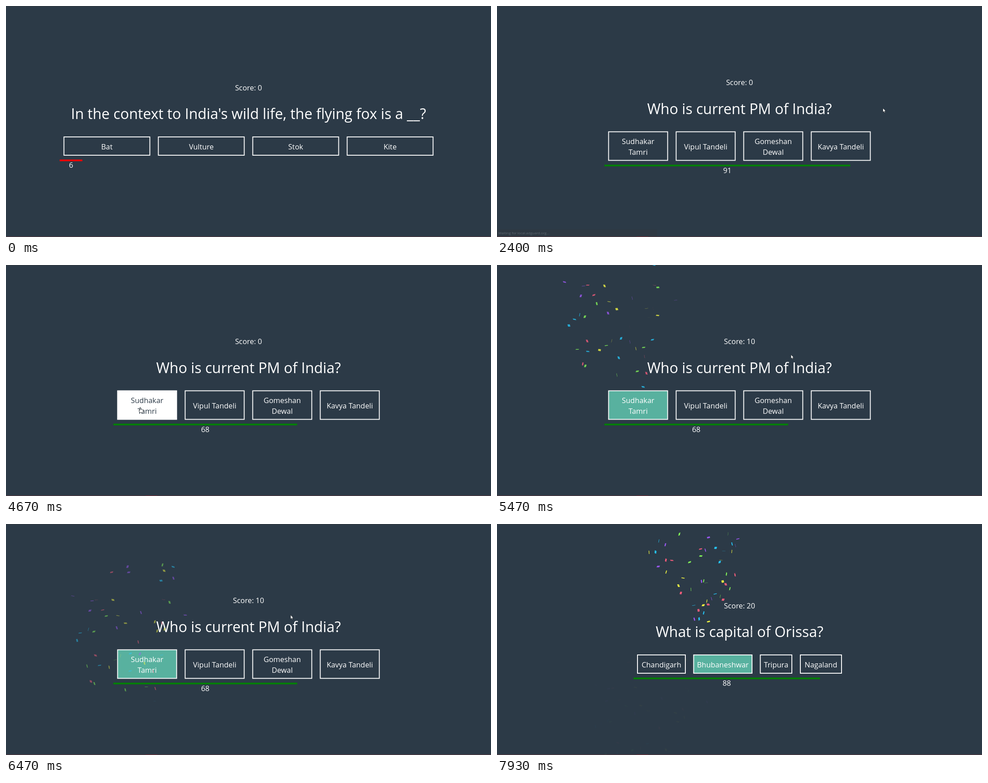
Animation, 1084 px wide and 517 px high, one loop 8 s. Source, as an HTML page with a canvas:

```html
<!DOCTYPE html>
<html lang="en">
<head>
<meta charset="utf-8">
<title>Quiz</title>
<style>
  html, body { margin: 0; width: 100%; height: 100%; overflow: hidden; background: #2c3a47; }
  svg, canvas { position: absolute; left: 0; top: 0; width: 1084px; height: 517px; }
  text { font: 16.4px "Open Sans", "Noto Sans", sans-serif; fill: #fff; text-anchor: middle; }
  .title { font-size: 32.3px; }
  .option rect { fill: none; stroke: #fff; stroke-width: 1.9; }
  .option.hover rect { fill: #fff; }
  .option.hover text { fill: #2c3a47; }
  .option.correct rect { fill: #58b19f; }
  #status text { font-size: 8px; text-anchor: start; fill: #aab0b4; }
</style>
</head>
<body>
<svg id="stage" viewBox="0 0 1084 517">
  <rect width="1084" height="1" fill="#343a40"/>
  <rect y="516" width="1084" height="1" fill="#5e3a40"/>
  <g id="status">
    <rect y="500" width="358" height="16" fill="#33363b"/>
    <text x="3" y="511">Waiting for local.adguard.org...</text>
  </g>
</svg>
<canvas id="fx" width="1084" height="517"></canvas>
<script>
const LOOP = 8000;
const stage = document.getElementById('stage');
const status = document.getElementById('status');
const ctx = document.getElementById('fx').getContext('2d');

function add(parent, tag, attrs, text) {
  const node = document.createElementNS('http://www.w3.org/2000/svg', tag);
  for (const key in attrs) node.setAttribute(key, attrs[key]);
  if (text) node.textContent = text;
  parent.appendChild(node);
  return node;
}

// dy moves the upper texts up and the timer down when options take two lines
function makeScene({ title, left, width, dy, options }) {
  const g = add(stage, 'g', {});
  const score = add(g, 'text', { x: 542, y: 188.7 - dy });
  add(g, 'text', { x: 542, y: 253 - dy, class: 'title' }, title);
  const boxes = options.map(([label, x, w]) => {
    const node = add(g, 'g', { class: 'option' });
    const y = 292 - dy, h = 43 + 2 * dy;
    add(node, 'rect', { x: x + 1, y: y + 1, width: w - 2, height: h - 2 });
    const lines = label.split('\n');
    lines.forEach((line, i) => add(node, 'text',
      { x: x + w / 2, y: 320.8 + (i - (lines.length - 1) / 2) * 23.4 }, line));
    return { node, x, y, w, h };
  });
  const bar = add(g, 'rect', { x: left, y: 343.6 + dy, height: 3.8 });
  const num = add(g, 'text', { y: 362 + dy });

  return {
    boxes,
    show(on) { g.style.display = on ? '' : 'none'; },
    update(points, count, correct, tip) {
      score.textContent = 'Score: ' + points;
      const w = width * count / 100;
      bar.setAttribute('width', w);
      bar.setAttribute('fill', count < 30 ? 'red' : 'green');
      num.setAttribute('x', left + w / 2);
      num.textContent = count;
      boxes.forEach((b, i) => {
        const state = i === correct ? ' correct' : inside(b, tip) ? ' hover' : '';
        b.node.setAttribute('class', 'option' + state);
      });
    }
  };
}

function inside(b, p) {
  return p && p.x > b.x && p.x < b.x + b.w && p.y > b.y && p.y < b.y + b.h;
}

const row = (labels, x, step, w) => labels.map((label, i) => [label, x + i * step, w]);

const wildlife = makeScene({
  title: "In the context to India's wild life, the flying fox is a __?",
  left: 120, width: 844, dy: 0,
  options: row(['Bat', 'Vulture', 'Stok', 'Kite'], 128.5, 211, 194)
});
const minister = makeScene({
  title: 'Who is current PM of India?',
  left: 240, width: 604, dy: 11.5,
  options: row(['Sudhakar\nTamri', 'Vipul Tandeli', 'Gomeshan\nDewal', 'Kavya Tandeli'], 248.4, 151, 134)
});
const capital = makeScene({
  title: 'What is capital of Orissa?',
  left: 305, width: 474, dy: 0,
  options: [['Chandigarh', 313, 109], ['Bhubaneshwar', 438.5, 132.5],
            ['Tripura', 587.5, 72.5], ['Nagaland', 677, 94]]
});

// Confetti
const COLORS = ['#26ccff', '#a25afd', '#ff5e7e', '#88ff5a', '#fcff42'];
const SCALE = 0.7057, TICKS = 200;

function seeded(seed) {
  return () => {
    seed = (seed + 0x6d2b79f5) | 0;
    let h = Math.imul(seed ^ (seed >>> 15), seed | 1);
    h ^= h + Math.imul(h ^ (h >>> 7), h | 61);
    return ((h ^ (h >>> 14)) >>> 0) / 4294967296;
  };
}

function makeBurst(seed, start, x, y) {
  const rnd = seeded(seed);
  const bits = Array.from({ length: 50 }, (_, i) => ({
    color: COLORS[i % COLORS.length],
    angle: -Math.PI / 2 + (0.5 - rnd()) * Math.PI / 4,
    speed: 22.5 + 45 * rnd(),
    wobble: 10 * rnd(),
    wobbleSpeed: Math.min(0.11, 0.05 + 0.1 * rnd()),
    tilt: (0.25 + 0.5 * rnd()) * Math.PI
  }));
  return { bits, start, x, y };
}

function drawBurst(burst, t, dx, dy) {
  const n = (t - burst.start) * 0.06;
  if (n <= 0 || n >= TICKS) return;
  const jitter = seeded(Math.round(n) + 3);
  ctx.save();
  ctx.translate(burst.x + dx, burst.y + dy);
  ctx.scale(SCALE, SCALE);
  ctx.globalAlpha = 1 - n / TICKS;
  for (const b of burst.bits) {
    const reach = b.speed * 10 * (1 - Math.pow(0.9, n));
    const x = Math.cos(b.angle) * reach;
    const y = Math.sin(b.angle) * reach + 3 * n;
    const wob = b.wobble + b.wobbleSpeed * n;
    const wx = x + 10 * Math.cos(wob), wy = y + 10 * Math.sin(wob);
    const r = 2 + jitter(), tilt = b.tilt + 0.1 * n;
    const tx = r * Math.cos(tilt), ty = r * Math.sin(tilt);
    ctx.fillStyle = b.color;
    ctx.beginPath();
    ctx.moveTo(x, y);
    ctx.lineTo(wx, y + ty);
    ctx.lineTo(wx + tx, wy + ty);
    ctx.lineTo(x + tx, wy);
    ctx.fill();
  }
  ctx.restore();
}

const bursts = [makeBurst(41, 4700, 270, 323), makeBurst(97, 7750, 452, 315)];

// Pointer
const PATH = [
  [1000, 1084, 27], [1500, 862.5, 228.5], [2400, 862.5, 228.5], [2800, 858, 230],
  [3560, 494, 296.5], [3700, 494, 296.5], [4450, 300, 318], [4740, 300, 318],
  [5380, 657, 200.5], [5470, 657, 200.5], [6470, 636, 203.5], [6930, 568, 243], [8000, 568, 243]
];
const ARROW = new Path2D('M0 0V9.2L2.1 7.3L3.6 10.5L5.1 9.8L3.7 6.7H6.4Z');
const HAND = new Path2D('M-1 1Q0 -.6 1 1V5L5.6 6.2Q7 6.6 6.6 8.2L5.8 12.4H-.4L-3 8.4Q-3.6 6.8 -1 7.6Z');
const BEAM = new Path2D('M-2 -5.5H2M0 -5.5V5.5M-2 5.5H2');

function pointerAt(t) {
  if (t < PATH[0][0]) return null;
  const i = PATH.findIndex(p => p[0] > t);
  const [t0, x0, y0] = PATH[i - 1], [t1, x1, y1] = PATH[i];
  const u = (t - t0) / (t1 - t0), k = u * u * (3 - 2 * u);
  return { x: x0 + (x1 - x0) * k, y: y0 + (y1 - y0) * k };
}

function drawPointer(p, kind) {
  ctx.save();
  ctx.translate(p.x, p.y);
  ctx.lineWidth = 0.8;
  if (kind === 'beam') {
    ctx.strokeStyle = '#7d8891';
    ctx.stroke(BEAM);
  } else {
    const shape = kind === 'hand' ? HAND : ARROW;
    ctx.fillStyle = '#fff';
    ctx.strokeStyle = '#1b2127';
    ctx.fill(shape);
    ctx.stroke(shape);
  }
  ctx.restore();
}

const countdown = (t, start, stop) =>
  Math.max(stop, Math.min(100, 100 - Math.floor((t - start) / 100)));

function render(t) {
  const p = pointerAt(t);
  const first = t < 260, third = t >= 6530, second = t >= 1430 && !third;

  wildlife.show(first);
  minister.show(second);
  capital.show(third);
  if (first) wildlife.update(0, t < 60 ? 6 : 5, -1, null);
  if (second) {
    const won = t >= 4700;
    minister.update(won ? 10 : 0, countdown(t, 1410, 68), won ? 0 : -1, p);
  }
  if (third) {
    const won = t >= 7750;
    capital.update(won ? 20 : 10, countdown(t, 6540, 88), won ? 1 : -1, null);
  }

  const fade = Math.max(0, Math.min(1, (2500 - t) / 260));
  status.style.opacity = t < 320 ? 0 : fade;

  ctx.clearRect(0, 0, 1084, 517);
  if (!first) {
    ctx.fillStyle = '#8a3038';
    ctx.fillRect(312, 516, 26, 1);
  }
  drawBurst(bursts[0], t, third ? 65 : 0, third ? 11.5 : 0);
  drawBurst(bursts[1], t, 0, 0);
  if (p) {
    const over = second && minister.boxes.some(b => inside(b, p));
    drawPointer(p, over ? 'hand' : third && p.y > 222 ? 'beam' : 'arrow');
  }
}

// The picture advances 15 times a second
function tick() {
  const t = performance.now() % LOOP;
  render(Math.min(119, Math.floor(t * 0.015 + 0.06)) / 0.015);
  requestAnimationFrame(tick);
}
tick();
</script>
</body>
</html>
```
